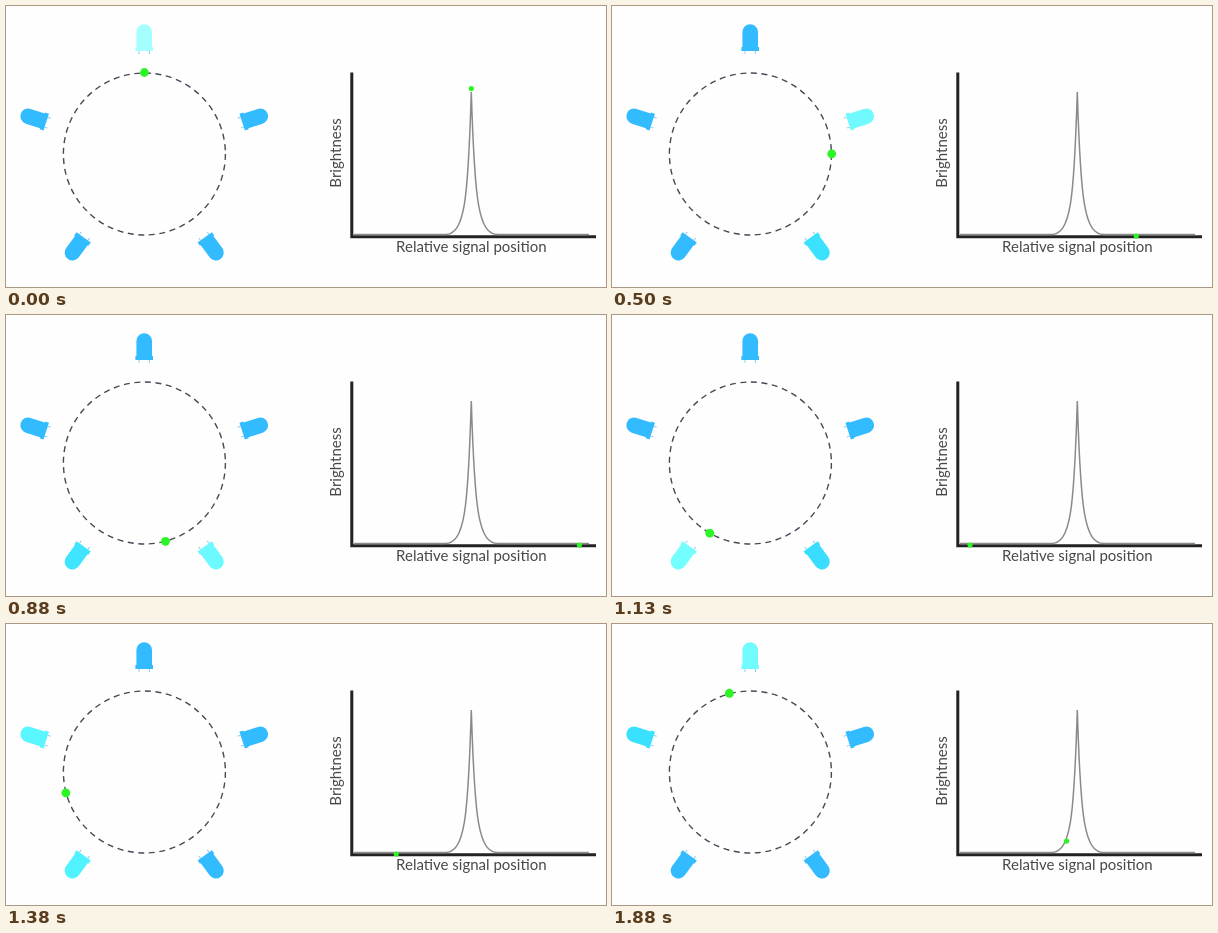
Animation of 600x281 px, one loop 2 s. Source, as an HTML page:

```html
<!DOCTYPE html>
<html lang="en">
<head>
<meta charset="utf-8">
<title>Rotating signal</title>
<style>
html, body { margin: 0; width: 100%; height: 100%; overflow: hidden; background: #fefefe; }
svg { display: block; width: 600px; height: 281px; }
text { font: 15px Lato, "Open Sans", sans-serif; fill: #484848; text-anchor: middle; }
.ring { fill: none; stroke: #444b55; stroke-width: 1.4; stroke-dasharray: 6 4.6; }
.axes { fill: none; stroke: #222; stroke-width: 3; }
.curve { fill: none; stroke: #8a8a8a; stroke-width: 1.5; }
.legs { stroke: #8fcdf0; stroke-width: 1; }
.dot { fill: #2cf525; }
</style>
</head>
<body>
<svg viewBox="0 0 600 281">
  <defs>
    <g id="led">
      <path class="legs" d="M-5.2-103v3M5.2-103v3"/>
      <path d="M-7.8-107V-122A7.8 7.8 0 0 1 7.8-122V-107H8.8V-103H-8.8V-107Z"/>
    </g>
  </defs>
  <circle class="ring" cx="138.4" cy="148" r="81"/>
  <g id="leds" transform="translate(138.2 148)"></g>
  <path class="axes" d="M345.8 66.5V230.8H590"/>
  <path class="curve" d="M348 228.5H438C459 230 462 195 465.3 86C468.6 195 472 230 493 228.5H583"/>
  <text x="465.3" y="246">Relative signal position</text>
  <text transform="translate(335 147) rotate(-90)">Brightness</text>
  <circle class="dot" id="runner" r="4.4"/>
  <circle class="dot" id="marker" r="2.6"/>
</svg>
<script>
const LOOP = 2000, STEPS = 16, PEAK_X = 465.3;
const byId = id => document.getElementById(id);

// LED colour by angular distance to the signal: [degrees, r, g, b]
const GLOW = [
  [0, 166, 255, 255], [3, 116, 255, 255], [18, 112, 250, 255],
  [36, 85, 245, 255], [54, 58, 226, 255], [66, 56, 221, 255], [72, 51, 187, 255]
];

const leds = Array.from({ length: 5 }, (_, i) => {
  const led = document.createElementNS("http://www.w3.org/2000/svg", "use");
  led.setAttribute("href", "#led");
  led.setAttribute("transform", `rotate(${72 * i})`);
  byId("leds").append(led);
  return led;
});

function glow(distance) {
  const next = GLOW.findIndex(stop => stop[0] >= distance);
  if (next < 0) return "rgb(51,187,255)";
  const b = GLOW[next], a = GLOW[Math.max(0, next - 1)];
  const mix = (distance - a[0]) / (b[0] - a[0] || 1);
  return `rgb(${[1, 2, 3].map(c => Math.round(a[c] + (b[c] - a[c]) * mix))})`;
}

function place(dot, x, y) {
  dot.setAttribute("cx", x);
  dot.setAttribute("cy", y);
}

// Steps start at multiples of 125 ms, rounded to 10 ms
function stepAt(time) {
  const step = Math.floor(time / LOOP * STEPS);
  return Math.round(step * 12.5) * 10 > time ? step - 1 : step;
}

function draw(now) {
  const angle = 15 * Math.ceil(1.5 * stepAt(now % LOOP));
  const rad = angle * Math.PI / 180;
  place(byId("runner"), 138.4 + 81.3 * Math.sin(rad), 147.8 - 81.3 * Math.cos(rad));

  const dx = angle <= 180 ? 0.655 * angle : 0.715 * (angle - 360);
  place(byId("marker"), PEAK_X + dx, 230 - 147.5 * Math.exp(-Math.abs(dx) / 4.4));

  leds.forEach((led, i) => {
    const gap = Math.abs(angle - 72 * i);
    led.setAttribute("fill", glow(Math.min(gap, 360 - gap)));
  });
}

function tick() {
  draw(performance.now());
  requestAnimationFrame(tick);
}
tick();
</script>
</body>
</html>
```
